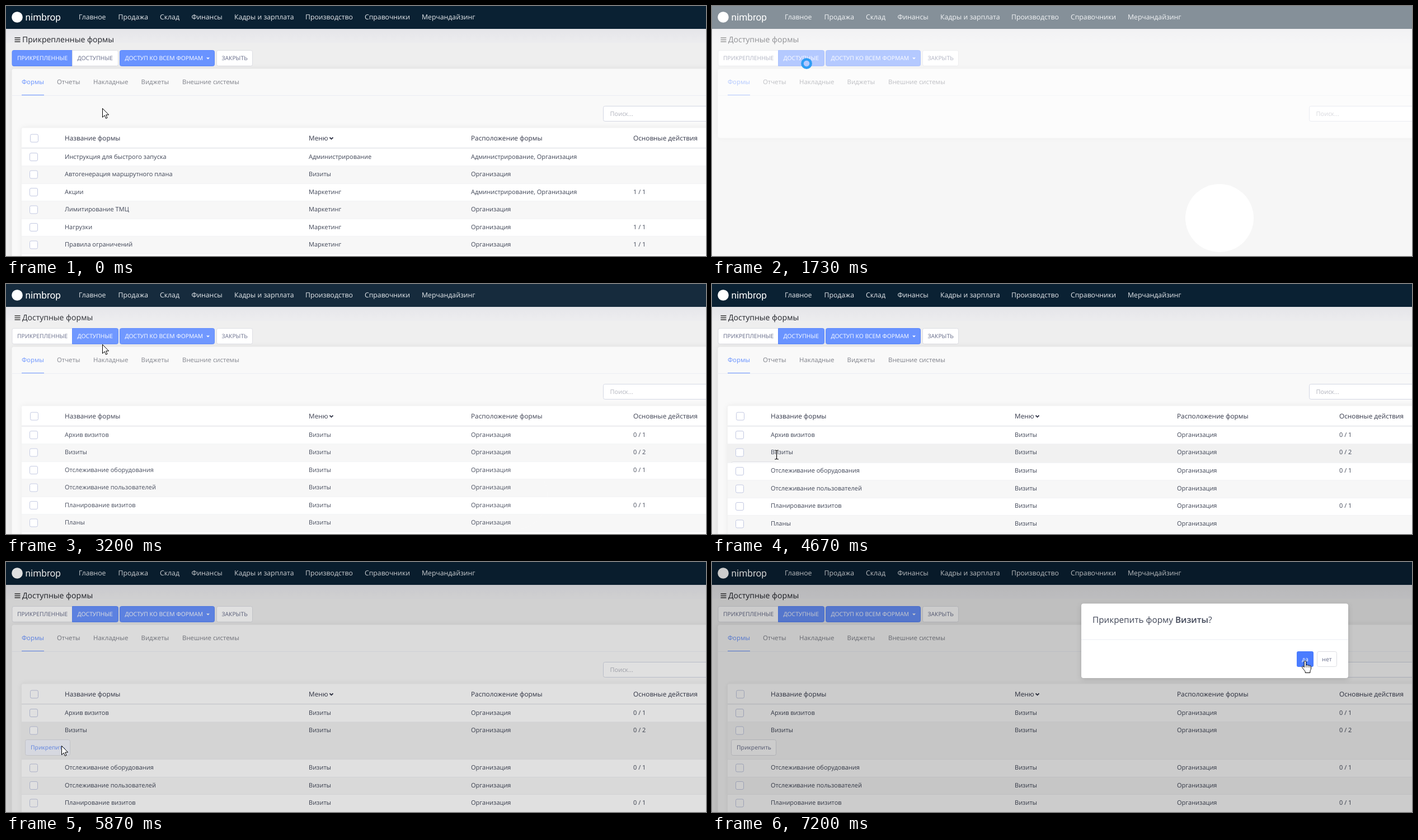
Animation of 1251 by 448 pixels, one loop 7.83 s. Source, as an HTML page:

```html
<!DOCTYPE html>
<html lang="ru">
<head>
<meta charset="utf-8">
<title>Формы</title>
<style>
html, body { margin: 0; width: 100%; height: 100%; overflow: hidden; background: #eee; }
svg { display: block; width: 100%; height: 100%; }
text { font-family: 'Open Sans', 'Noto Sans', sans-serif; text-rendering: geometricPrecision; white-space: pre; }
.brand { font-family: Roboto, sans-serif; }
.sheet { filter: drop-shadow(0 0 5px rgba(0, 0, 0, .07)); }
.box { filter: drop-shadow(0 2px 5px rgba(0, 0, 0, .15)); }
</style>
</head>
<body>
<svg id="stage" viewBox="0 0 1251 448" preserveAspectRatio="none"></svg>
<script>
const LOOP = 7830;
const BLUE = '#6993ff', EDGE = '#5b88fc', INK = '#3f4556', GREY = '#646a88', LINE = '#e6e7ec';
const COLS = [105, 541, 831, 1121];
const ROW = 31.5, TOP = 255.5, OPEN = 35.5;

const ATTACHED = [
  ['Инструкция для быстрого запуска', 'Администрирование', 'Администрирование, Организация', ''],
  ['Автогенерация маршрутного плана', 'Визиты', 'Организация', ''],
  ['Акции', 'Маркетинг', 'Администрирование, Организация', '1 / 1'],
  ['Лимитирование ТМЦ', 'Маркетинг', 'Организация', ''],
  ['Нагрузки', 'Маркетинг', 'Организация', '1 / 1'],
  ['Правила ограничений', 'Маркетинг', 'Организация', '1 / 1']
];
const AVAILABLE = [
  ['Архив визитов', '0 / 1'], ['Визиты', '0 / 2'], ['Отслеживание оборудования', '0 / 1'],
  ['Отслеживание пользователей', ''], ['Планирование визитов', '0 / 1'], ['Планы', '']
].map(([name, count]) => [name, 'Визиты', 'Организация', count]);

const text = (x, y, s, size, fill, more = '') =>
  `<text x="${x}" y="${y}" font-size="${size}" fill="${fill}" ${more}>${s}</text>`;
const rect = (x, y, w, h, fill, more = '') =>
  `<rect x="${x}" y="${y}" width="${w}" height="${h}" fill="${fill}" ${more}/>`;
const path = (d, more) => `<path d="${d}" ${more}/>`;
const group = (id, body, more = '') => `<g id="${id}" ${more}>${body}</g>`;

function button(x, w, label, on, corners = 'both') {
  const l = corners === 'right' ? 0 : 3, r = corners === 'left' ? 0 : 3;
  const d = `M${x + l} 79.5h${w - l - r}q${r} 0 ${r} ${r}v${28 - 2 * r}q0 ${r} ${-r} ${r}h${l + r - w}` +
    `q${-l} 0 ${-l} ${-l}v${2 * l - 28}q0 ${-l} ${l} ${-l}Z`;
  return path(d, `fill="${on ? BLUE : '#fff'}" stroke="${on ? EDGE : '#dcdde2'}"`) +
    text(x + 9, 97.4, label, 10.35, on ? '#fff' : GREY);
}

function check(x, y) {
  return rect(x, y, 14, 14, '#fff', 'rx="2.5" stroke="#c3c9e2"');
}

function row(cells, i, extra = 0) {
  const y = TOP + i * ROW;
  return rect(28, y, 1223, ROW + extra, i % 2 ? '#f7f7f7' : '#fff', `data-row="${i}"`) +
    rect(28, y + ROW - .5, 1223, extra ? 0 : 1, LINE) +
    check(42.5, y + 8) +
    cells.map((s, c) => text(COLS[c], y + 18, s, 11, INK)).join('');
}

function table(rows, id) {
  const heads = ['Название формы', 'Меню', 'Расположение формы', 'Основные действия'];
  const lower = rows.slice(2).map((cells, i) => row(cells, i + 2)).join('') +
    rect(28, TOP + 6 * ROW, 1223, 40, '#fff');
  const attach = group('attach',
    rect(34.5, 318.5, 80, 28, '#fff', 'id="attachBox" rx="3" stroke="#dcdde2"') +
    text(44, 336.3, 'Прикрепить', 10.35, GREY, 'id="attachText"'));
  return rect(28, 218.5, 1240, 300, '#fff', 'class="sheet" rx="3"') +
    check(43.5, 230) +
    heads.map((s, c) => text(COLS[c], 241, s, 11.8, '#34384a', 'font-weight="500"')).join('') +
    path('M578.5 235.5l3 3 3-3', 'fill="none" stroke="#34384a" stroke-width="1.8"') +
    rect(28, 253.8, 1223, 1.8, '#e3e4e8') +
    row(rows[0], 0) + row(rows[1], 1, id ? OPEN + 2 : 0) +
    (id ? attach : '') +
    group(id || 'rest', rect(28, TOP + 2 * ROW - .5, 1223, 1, LINE) + lower);
}

function card(h) {
  const tabs = [[28, 'Формы'], [91, 'Отчеты'], [156, 'Накладные'], [241.5, 'Виджеты'], [315, 'Внешние системы']];
  return rect(10.5, 112.5, 1260, h, '#f9f9f9', 'class="sheet" rx="4"') +
    rect(11, 160, 1240, 1, '#ebedf3') +
    rect(28, 159, 40, 1, BLUE) +
    tabs.map(([x, s], i) => text(x, 140.3, s, 11.4, i ? '#7e8089' : BLUE)).join('') +
    rect(1067.5, 179.5, 220, 27, '#fff', 'rx="3" stroke="#d3d7e3"') +
    text(1079.5, 197, 'Поиск...', 11, '#b1b3bd');
}

function tools(first) {
  return button(11, 107.5, 'ПРИКРЕПЛЕННЫЕ', first, 'left') +
    button(118.5, 82, 'ДОСТУПНЫЕ', !first, 'right') +
    button(203.5, 169, 'ДОСТУП КО ВСЕМ ФОРМАМ', true) +
    path('M358 92.5h6l-3 3Z', 'fill="#fff"') +
    button(376.5, 64, 'ЗАКРЫТЬ', false);
}

const title = s => text(29, 65, s, 14, '#212329', 'font-weight="500"');

function header() {
  const menu = [[130, 'Главное'], [200.5, 'Продажа'], [275, 'Склад'], [331.5, 'Финансы'],
    [408, 'Кадры и зарплата'], [535, 'Производство'], [641, 'Справочники'], [743, 'Мерчандайзинг']];
  return rect(0, 0, 1251, 41, '#0a2133') +
    '<circle cx="20" cy="20" r="9.8" fill="#fff"/>' +
    text(34.5, 25.5, 'nimbrop', 17.2, '#fff', 'class="brand"') +
    menu.map(([x, s]) => text(x, 24, s, 12.25, '#e6e9ed')).join('');
}

function modal() {
  return rect(660, 74.5, 477, 133.5, '#fff', 'class="box" rx="4"') +
    rect(660, 138.5, 477, 1, '#ebedf3') +
    text(680, 108.5, 'Прикрепить форму <tspan font-weight="600">Визиты</tspan>?', 15.3, INK) +
    rect(1045, 160, 30, 28, BLUE, 'id="yes" rx="3"') +
    text(1060, 177.5, 'да', 10.4, '#fff', 'text-anchor="middle"') +
    rect(1081.5, 160.5, 35, 27, '#fff', 'rx="3" stroke="#dcdde2"') +
    text(1099, 177.5, 'нет', 10.4, GREY, 'text-anchor="middle"');
}

function cursors() {
  const beam = 'M-3.5-8h2.2l1.3 1 1.3-1H3.5M0-7V7M-3.5 8h2.2l1.3-1 1.3 1H3.5';
  const edge = 'fill="#fff" stroke="#000" stroke-linejoin="round"';
  return group('arrow', path('M.5.5V16.5L4.2 13 6.5 18.5 9 17.4 6.7 12H11.7Z', edge)) +
    group('hand', path('M-1.7 2a1.7 1.7 0 0 1 3.4 0V8.3c.5-1.2 3-1.2 3.4.2.6-.9 2.6-.8 3 .6.7-.7 2.4-.2 2.4 1.6V14' +
      'c0 2-1.4 3-1.6 5v2.5H.2V19.3C-1 17.5-4.5 13.5-5.3 11.8c-.8-1.7 1.3-2.7 2.5-1.4L-1.7 11.8Z', edge) +
      path('M1.7 8.3V12M5.1 8.7V12M8.1 9.3V12', 'stroke="#000" stroke-width=".8"')) +
    group('ring', '<circle r="7.6" fill="none" stroke="#2f9df4" stroke-width="4.6"/>') +
    group('beam', path(beam, 'fill="none" stroke="#fff" stroke-width="2.6"') +
      path(beam, 'fill="none" stroke="#000" stroke-width="1.2"'));
}

document.getElementById('stage').innerHTML =
  '<defs><linearGradient id="shade" x2="0" y2="1"><stop stop-color="#e5e5e9"/>' +
  '<stop offset="1" stop-color="#ececee"/></linearGradient></defs>' +
  rect(0, 0, 1251, 448, '#eee') +
  rect(0, 41, 1251, 25, 'url(#shade)') +
  path('M15.5 57h10M15.5 60.5h10M15.5 64h10', 'stroke="#333" stroke-width="1.3"') +
  group('titleA', title('Прикрепленные формы')) +
  group('titleB', title('Доступные формы')) +
  group('pageA', tools(true) + group('hot',
    rect(119, 80, 81.5, 27.5, '#f1f4ff') + text(127.5, 97.4, 'ДОСТУПНЫЕ', 10.35, BLUE)) +
    card(400) + table(ATTACHED)) +
  group('pageB', tools(false) + group('cardShort', card(124)) +
    group('full', card(400) + table(AVAILABLE, 'lower'))) +
  header() +
  group('veil', rect(0, 0, 1251, 448, '#fff', 'opacity=".5"') +
    '<circle cx="907" cy="380" r="61" fill="#fff"/>') +
  rect(0, 0, 1251, 448, '#000', 'id="dim"') +
  group('modal', modal()) +
  group('cursor', cursors());

const el = id => document.getElementById(id);
const show = (id, on) => { el(id).style.display = on ? '' : 'none'; };
const fade = (id, a) => { el(id).setAttribute('opacity', a); show(id, a > 0); };
const part = (t, a, b) => Math.min(1, Math.max(0, (t - a) / (b - a)));
const swing = p => .5 - Math.cos(p * Math.PI) / 2;
const out = p => 1 - (1 - p) ** 3;
const mix = (a, b, p) => 'rgb(' + a.map((v, i) => Math.round(v + (b[i] - v) * p)) + ')';

// time, x, y, pointer shape from then on, eased
const MOVES = [
  [0, 172, 183, 'arrow'], [270, 172, 183, 'arrow'], [480, 202, 142, 'arrow'], [620, 187, 108, 'hand'],
  [770, 169, 98, 'hand'], [1100, 169, 98, 'ring'], [1600, 169, 98, 'ring'], [1730, 169, 103, 'ring'],
  [1870, 172, 108, 'arrow'], [3300, 172, 108, 'arrow'], [3670, 168, 133, 'arrow'],
  [4050, 130, 262, 'beam'], [4110, 126, 277, 'arrow'], [4180, 121, 294, 'beam'],
  [4270, 115.5, 306, 'beam'], [4700, 115.5, 306, 'beam'], [4800, 112, 312, 'arrow'],
  [5200, 99, 322, 'hand'], [5430, 92, 329, 'hand'], [5500, 91, 328, 'hand'], [5700, 91, 328, 'arrow'],
  [5800, 99, 329, 'arrow'], [5870, 99, 329, 'arrow', true], [6470, 1073, 190, 'arrow'],
  [6530, 1071, 184, 'hand'], [6800, 1062, 179, 'hand'], [7200, 1060, 177, 'hand'], [LOOP, 1060, 177, 'hand']
];

function pointer(t) {
  let i = 0;
  while (i < MOVES.length - 2 && t >= MOVES[i + 1][0]) i++;
  const [t0, x0, y0, kind, eased] = MOVES[i], [t1, x1, y1] = MOVES[i + 1];
  let p = part(t, t0, t1);
  if (eased) p = swing(p);
  el('cursor').setAttribute('transform', `translate(${x0 + (x1 - x0) * p} ${y0 + (y1 - y0) * p})`);
  for (const k of ['arrow', 'hand', 'ring', 'beam']) show(k, k === kind);
}

const rowBack = [0, 1].map(i => document.querySelector(`#full [data-row="${i}"]`));

function draw(t) {
  show('pageA', t < 1070);
  show('titleA', t < 1100);
  fade('hot', part(t, 600, 750));
  show('pageB', t >= 1300);
  show('titleB', t >= 1300);
  show('cardShort', t < 2900);
  show('full', t >= 2900);
  fade('veil', swing(part(t, 1300, 1700)) - swing(part(t, 2880, 3280)));

  rowBack[0].setAttribute('fill', t >= 4020 && t < 4125 ? '#f1f1f1' : '#fff');
  rowBack[1].setAttribute('fill', t >= 4125 && t < 5900 ? '#f1f1f1' : '#f7f7f7');

  const open = t < 4670 ? 0 : OPEN * swing(part(t, 4610, 5010));
  el('lower').setAttribute('transform', `translate(0 ${open})`);
  show('attach', open > 0);
  const hover = part(t, 5180, 5330) - part(t, 5870, 6020);
  el('attachBox').setAttribute('fill', mix([255, 255, 255], [244, 246, 255], hover));
  el('attachText').setAttribute('fill', mix([100, 106, 136], [105, 147, 255], hover));

  fade('dim', .2 * part(t, 5780, 5930));
  fade('modal', part(t, 5900, 6050));
  el('modal').setAttribute('transform', `translate(0 ${-50 * (1 - out(part(t, 5900, 6200)))})`);
  el('yes').setAttribute('fill', mix([105, 147, 255], [74, 124, 255], part(t, 6530, 6680)));
  pointer(t);
}

const start = performance.now();
function tick() {
  draw((performance.now() - start) % LOOP);
  requestAnimationFrame(tick);
}
tick();
</script>
</body>
</html>
```
